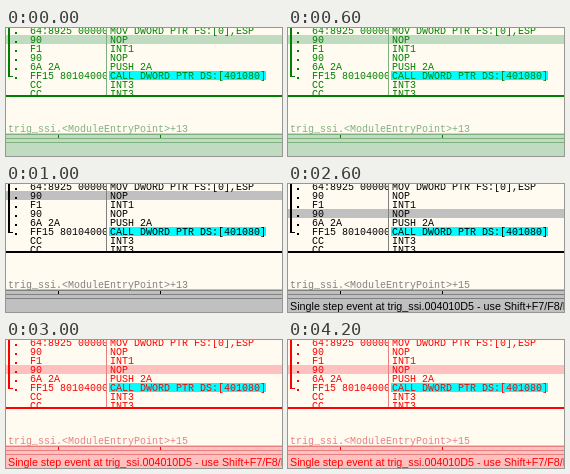
These frames come from a looping animation (276 by 128 pixels, 5 s). An HTML page:

```html
<!DOCTYPE html>
<html lang="en">
<head>
<meta charset="utf-8">
<title>Debugger step</title>
<style>
html, body { margin: 0; width: 100%; height: 100%; overflow: hidden; }
svg { display: block; width: 276px; height: 128px; }
text { white-space: pre; }
.mono { font: 10px "Liberation Mono", monospace; }
.ui { font: 10.75px "Liberation Sans", sans-serif; }
</style>
</head>
<body>
<svg id="stage" viewBox="0 0 276 128"></svg>
<script>
const stage = document.getElementById("stage");
const LOOP = 5000, ROW = 9, PANE = 67, PAPER = "#fffbf0", CALL = "#00ffff";
const listing = [
  ["64:8925 00000000", "MOV DWORD PTR FS:[0],ESP"],
  ["90", "NOP"],
  ["F1", "INT1"],
  ["90", "NOP"],
  ["6A 2A", "PUSH 2A"],
  ["FF15 80104000", "CALL DWORD PTR DS:[401080]"],
  ["CC", "INT3"],
  ["CC", "INT3"]
];
const themes = {
  green: { ink: "#008000", bar: "#c0dcc0", shade: "#80b080" },
  plain: { ink: "#000000", bar: "#c0c0c0", shade: "#808080" },
  red: { ink: "#ff0000", bar: "#ffc0c0", shade: "#e88080" }
};
const scenes = [
  { from: 0, theme: "green", row: 1, offset: 13 },
  { from: 1000, theme: "plain", row: 1, offset: 13 },
  { from: 2000, theme: "plain", row: 3, offset: 15, stepped: true },
  { from: 3000, theme: "red", row: 3, offset: 15, stepped: true }
];

const escapeText = s => s.replace(/&/g, "&amp;").replace(/</g, "&lt;").replace(/>/g, "&gt;");
const box = (x, y, w, h, fill) =>
  `<rect x="${x}" y="${y}" width="${w}" height="${h}" fill="${fill}" shape-rendering="crispEdges"/>`;
const label = (x, y, s, fill, kind = "mono", extra = "") =>
  `<text x="${x}" y="${y}" class="${kind}" fill="${fill}" ${extra}>${escapeText(s)}</text>`;

function drawCode({ ink, bar, shade }, row) {
  let out = box(0, row * ROW - 2, 276, ROW, bar) + box(103, 43, 157, ROW, CALL);
  listing.forEach(([hex, code], i) => {
    const y = i * ROW + 6;
    out += label(24, y, hex, ink, "mono", 'clip-path="url(#hex)"');
    out += label(104, y, code, ink, "mono", 'clip-path="url(#pane)"');
    if (i < 6) out += box(9, y - 2, 2, 2, ink);
  });
  out += box(2, 0, 2, 49, ink) + box(4, 48, 3, 1, ink);
  out += box(100, 0, 1, PANE, shade);
  return out + box(0, PANE, 276, 2, ink);
}

function drawBars({ ink, bar, shade }) {
  let out = box(0, 105, 276, 23, bar);
  for (const y of [106, 110, 114]) out += box(0, y, 276, 1, shade);
  for (const x of [52, 154]) out += box(x, 107, 1, 3, ink);
  return out;
}

function drawScene({ theme, row, offset, stepped }) {
  const c = themes[theme];
  let out = `<clipPath id="hex"><rect width="100" height="${PANE}"/></clipPath>` +
    `<clipPath id="pane"><rect width="276" height="${PANE}"/></clipPath>`;
  out += box(0, 0, 276, 128, PAPER) + drawCode(c, row) + drawBars(c);
  out += label(2, 104, `trig_ssi.<ModuleEntryPoint>+${offset}`, c.shade);
  if (stepped) {
    out += label(2, 126, "Single step event at trig_ssi.004010D5 - use Shift+F7/F8/F9", c.ink, "ui");
  }
  return out;
}

const start = performance.now();
let shown = null;
function update(now) {
  const t = Math.max(0, now - start) % LOOP;
  const scene = scenes.filter(s => s.from <= t).pop();
  if (scene !== shown) {
    stage.innerHTML = drawScene(scene);
    shown = scene;
  }
  requestAnimationFrame(update);
}
update(start);
</script>
</body>
</html>
```
